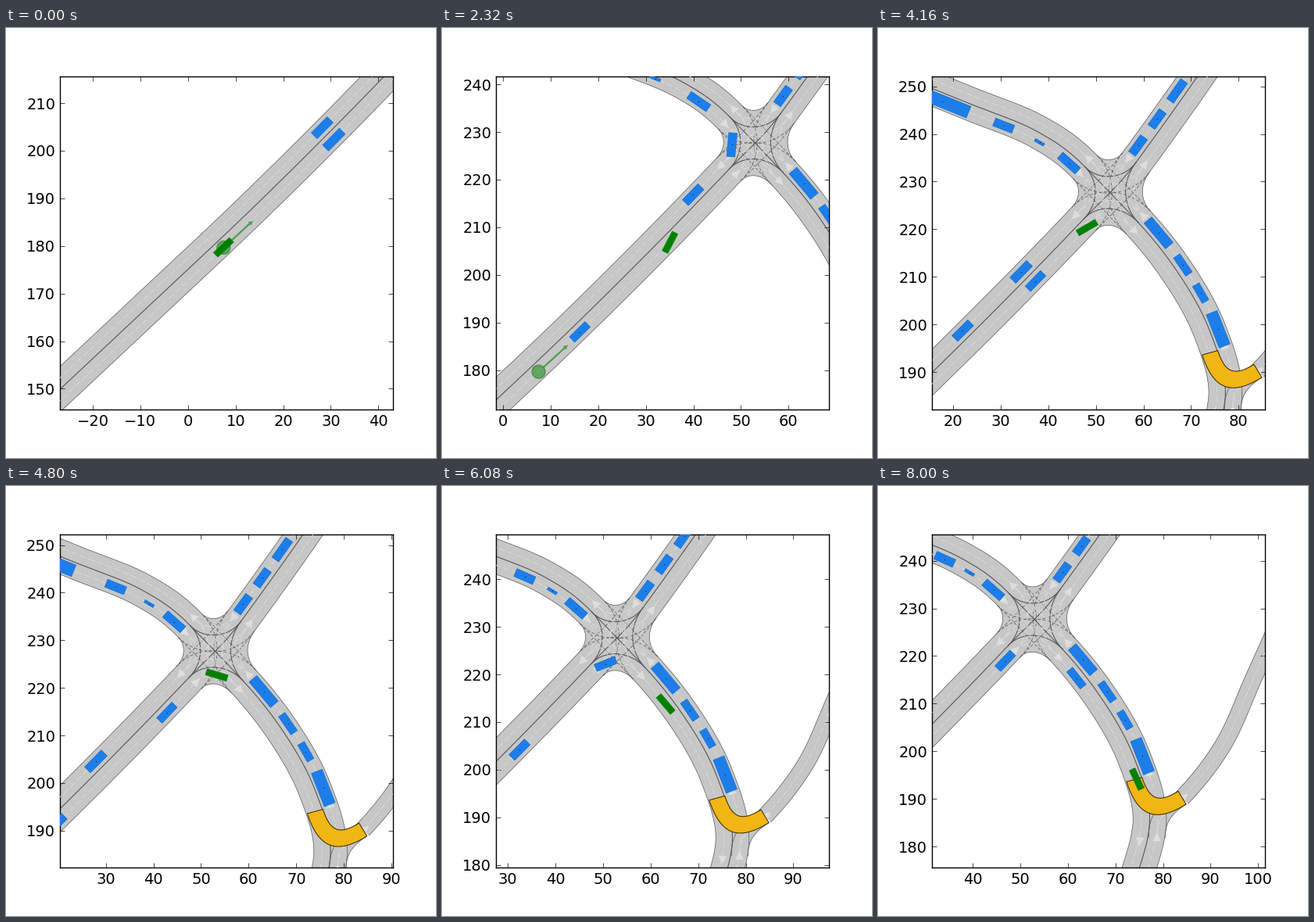
These frames come from a looping animation (550 by 550 pixels, 8.08 s). A matplotlib script:

```python
import numpy as np
import matplotlib.pyplot as plt
from matplotlib.animation import FuncAnimation
from matplotlib.patches import Circle, Polygon
from matplotlib.ticker import MultipleLocator

FRAMES, STEP = 101, 80
SPAN = 70
LANE = 3.5
GAP = 2.65
ROAD, BOUND, PAINT = "#c7c7c7", "#555555", "#dddddd"
BLUE, BLUE_EDGE, GREEN = "#1d7eea", "#0066cc", "#008000"

plt.rcParams.update({
    "font.family": "DejaVu Sans", "font.size": 14, "axes.linewidth": 1.0,
    "axes.axisbelow": False, "xtick.top": True, "ytick.right": True,
})
for axis in ("xtick", "ytick"):
    plt.rcParams.update({
        axis + ".direction": "in", axis + ".major.size": 4,
        axis + ".major.width": 0.5, axis + ".major.pad": 4,
        axis + ".labelsize": 14,
    })

fig = plt.figure(figsize=(5.5, 5.5), dpi=100, facecolor="white")
ax = fig.add_axes([0.125, 0.1125, 0.775, 0.775])
ax.xaxis.set_major_locator(MultipleLocator(10))
ax.yaxis.set_major_locator(MultipleLocator(10))


def spline(t, v, s):
    """Hermite curve through the rows of v at t, held beyond the ends."""
    s = np.clip(s, t[0], t[-1])
    m = np.gradient(v, t, axis=0, edge_order=min(2, len(t) - 1))
    i = np.clip(np.searchsorted(t, s, "right") - 1, 0, len(t) - 2)
    h = (t[i + 1] - t[i])[:, None]
    u = (s - t[i])[:, None] / h
    return ((1 + 2 * u) * (1 - u) ** 2 * v[i] + u * (1 - u) ** 2 * h * m[i]
            + u * u * (3 - 2 * u) * v[i + 1] + u * u * (u - 1) * h * m[i + 1])


def timeline(*keys):
    keys = np.array(keys, float)
    return spline(keys[:, 0], keys[:, 1:], np.arange(FRAMES))


def length_along(line):
    return np.r_[0, np.cumsum(np.hypot(*np.diff(line, axis=0).T))]


def smooth(*pts):
    pts = np.array(pts, float)
    t = length_along(pts)
    return spline(t, pts, np.linspace(0, t[-1], 160))


def heading(deg):
    a = np.radians(deg)
    return np.array([np.cos(a), np.sin(a)])


def angle(vec):
    return np.degrees(np.arctan2(vec[1], vec[0]))


def offset(line, d):
    g = np.gradient(line, axis=0)
    normal = np.c_[-g[:, 1], g[:, 0]] / np.hypot(g[:, 0], g[:, 1])[:, None]
    return line + d * normal


def bend(p, a, q, b, k=0.4):
    """Cubic that leaves p heading a and reaches q from the side it faces, b."""
    p, q = np.array(p), np.array(q)
    grip = k * np.hypot(*(q - p))
    p1, q1 = p + grip * heading(a), q + grip * heading(b)
    u = np.linspace(0, 1, 40)[:, None]
    return ((1 - u) ** 3 * p + 3 * u * (1 - u) ** 2 * p1
            + 3 * u * u * (1 - u) * q1 + u ** 3 * q)


def stroke(line, color=BOUND, lw=0.5, dash="-", z=2):
    ax.plot(line[:, 0], line[:, 1], color=color, lw=lw, ls=dash, zorder=z)


def paint(line):
    stroke(line, PAINT, 0.6, (0, (10, 4)), 3)


def strip(left, right, dash="-"):
    ax.add_patch(Polygon(np.r_[left, right[::-1]], fc=ROAD, ec="none", zorder=1))
    stroke(left)
    stroke(right, dash=dash)


def arrow_mark(at, deg):
    f, s = heading(deg), heading(deg + 90)
    ax.add_patch(Polygon([at + f, at - 0.8 * f + 0.9 * s, at - 0.8 * f - 0.9 * s],
                         fc=PAINT, ec="none", zorder=3))


# Arms of the crossing, anticlockwise, each running outward
SW, SE, NE, NW = range(4)
arms = [
    smooth((47.5, 222.2), (13, 187.4), (-8, 167.6), (-70, 109.9)),
    smooth((58.9, 221.4), (66.4, 212.1), (73.9, 198.7), (77.2, 185.3),
           (75.2, 176), (72.5, 169)),
    smooth((58.4, 234), (64.2, 242), (71.4, 252.2), (78, 262)),
    smooth((47.7, 233.1), (43.5, 236.85), (37.7, 240.5), (24.4, 246), (-10, 259.6)),
]
inward = [angle(arm[0] - arm[1]) for arm in arms]


def mouth(i, d):
    return arms[i][0] + d * heading(inward[i] + 90)


def turn(i, j, d):
    return bend(mouth(i, -d), inward[i], mouth(j, d), inward[j])


for i, arm in enumerate(arms):
    strip(offset(arm, LANE), offset(arm, -LANE))
    stroke(arm, lw=0.8)
    for side in (1, -1):
        paint(offset(arm, side * LANE / 2))
        arrow_mark(mouth(i, -side * LANE / 2) + (side - 0.4) * 0.6 * heading(inward[i]),
                   inward[i] + 90 - 90 * side)
    for step in (1, 2, 3):
        j = (i + step) % 4
        strip(turn(i, j, 0), turn(i, j, LANE), "-" if step == 1 else (0, (6, 3)))
        paint(turn(i, j, LANE / 2))

# Side road, its slip lane and the goal area
spur = smooth((84, 190.2), (92.2, 200.6), (99, 215.3), (104, 226.5))
strip(offset(spur, LANE / 2), offset(spur, -LANE / 2))
paint(spur)
left = bend((77, 181.9), 92, (83.1, 191.6), 212)
right = bend((80.5, 181.9), 92, (84.85, 188.85), 212)
strip(left, right)
paint((left + right) / 2)
for x, y, deg in [(77, 195.6, 107), (75.1, 181.1, -95), (78.7, 181.9, 88),
                  (84.5, 190.4, 32)]:
    arrow_mark(np.array([x, y]), deg)

inner = bend((75.6, 194.5), -72, (83.2, 191.6), 212, 0.6)
outer = bend((72.33, 193.6), -72, (84.85, 188.87), 212, 0.57)
ax.add_patch(Polygon(np.r_[inner, outer[::-1]], fc="#f1b514", ec="#302404",
                     lw=0.7, zorder=5))

# Initial state
home, aim = np.array([7.48, 179.65]), heading(42.5)
ax.add_patch(Circle(home, 1.4, fc=GREEN, ec=GREEN, lw=1, alpha=0.5, zorder=8))
ax.arrow(*(home + 1.4 * aim), *(6.95 * aim), width=0.36, head_width=0.95,
         head_length=0.95, length_includes_head=True, fc=GREEN, ec="none",
         alpha=0.62, zorder=8)


class Car:
    """Follows the lane from arm i to arm j; distance is zero at the stop line."""

    def __init__(self, size, i, j, motion, color=BLUE, edge=BLUE_EDGE, z=20):
        self.size = size
        enter = offset(arms[i], LANE / 2)[::-1]
        self.path = np.r_[enter, turn(i, j, LANE / 2)[1:],
                          offset(arms[j], -LANE / 2)[1:]]
        self.dist = length_along(self.path)
        self.dist -= self.dist[len(enter) - 1]
        self.motion = motion
        self.patch = Polygon(np.zeros((4, 2)), fc=color, ec=edge, lw=0.4, zorder=z)
        ax.add_patch(self.patch)

    def at(self, s):
        return np.array([np.interp(s, self.dist, c) for c in self.path.T])

    def place(self, frame):
        s, side, yaw = np.r_[self.motion[frame], 0, 0][:3]
        length, width = self.size
        deg = angle(self.at(s + length / 4) - self.at(s - length / 4))
        pos = self.at(s) + side * heading(deg + 90)
        f = heading(deg + yaw) * length / 2
        w = heading(deg + yaw + 90) * width / 2
        self.patch.set_xy([pos + f + w, pos + f - w, pos - f - w, pos - f + w])
        return pos


# Motion keys: frame, distance
cars = [
    Car((4.75, 1.75), NW, SW, timeline((0, 35.3), (60, 139.6))),
    Car((4.7, 1.75), NW, SW, timeline((0, -3), (13, 6.6), (29, 18.5), (52, 44), (80, 80))),
    Car((5, 1.75), NW, SW, timeline((0, -14), (29, 5), (52, 26.6), (80, 62))),
    Car((4.95, 1.75), NW, SW, timeline((0, -24), (29, -7), (45, -2.9))),
    Car((2.2, 0.6), NW, SW, timeline((0, -29), (29, -17.3), (52, -10.5), (76, -9.1))),
    Car((4.3, 1.75), NW, SW, timeline((0, -45), (29, -30), (52, -18.8), (68, -16.4),
                                      (100, -15))),
    Car((12, 2.6), NW, SW, timeline((29, -50), (52, -32.7))),
    Car((5, 1.75), SW, NE, timeline((0, -26), (40, 60.4))),
    Car((4.6, 1.6), SW, SE, timeline((0, -110), (13, -77.2), (29, -46.4), (52, -16.5),
                                     (68, -2.1), (84, 6), (100, 16.4))),
    Car((4.6, 1.7), SW, SE, timeline((0, -130), (68, -32.2), (84, -15.4), (100, -2.75))),
]

# Waiting queues
for arm, sizes in [(NE, [(4.3, 1.8), (4.1, 1.8), (5.1, 1.75)]),
                   (SE, [(7, 2.1), (4.6, 1.65), (4.1, 1.6), (7.5, 2.45)])]:
    back = -1
    for size in sizes:
        cars.append(Car(size, arm, NW, np.full((FRAMES, 1), back - size[0] / 2)))
        back -= size[0] + GAP

# Driven car: frame, distance, drift to the left, extra yaw
cars.append(Car((4.6, 1.35), SW, SE, timeline(
    (0, -58.4, 0, 0), (13, -36.8, -0.7, -3), (29, -19.7, 0, 17), (52, -0.9, 0, -16),
    (68, 11.1, 0.3, 0), (84, 26.2, 0, 5), (100, 41.1, 0.7, 6)), GREEN, GREEN, 25))

dots, = ax.plot([], [], "k.", ms=1.3, mew=0, zorder=22)

view = timeline((0, 8.06, 180.62), (13, 19.46, 192.69), (29, 33.48, 206.69),
                (52, 50.52, 217.1), (68, 59.38, 216.2), (84, 64.7, 212.52),
                (100, 66.42, 210.55))


def draw(frame):
    dots.set_data(*np.transpose([car.place(frame) for car in cars]))
    dots.set_visible(frame > 0)
    cx, cy = view[frame]
    ax.set_xlim(cx - SPAN / 2, cx + SPAN / 2)
    ax.set_ylim(cy - SPAN / 2, cy + SPAN / 2)
    return []


anim = FuncAnimation(fig, draw, frames=FRAMES, init_func=lambda: draw(0),
                     interval=STEP, repeat=True, repeat_delay=0, blit=False)
plt.show()
```
